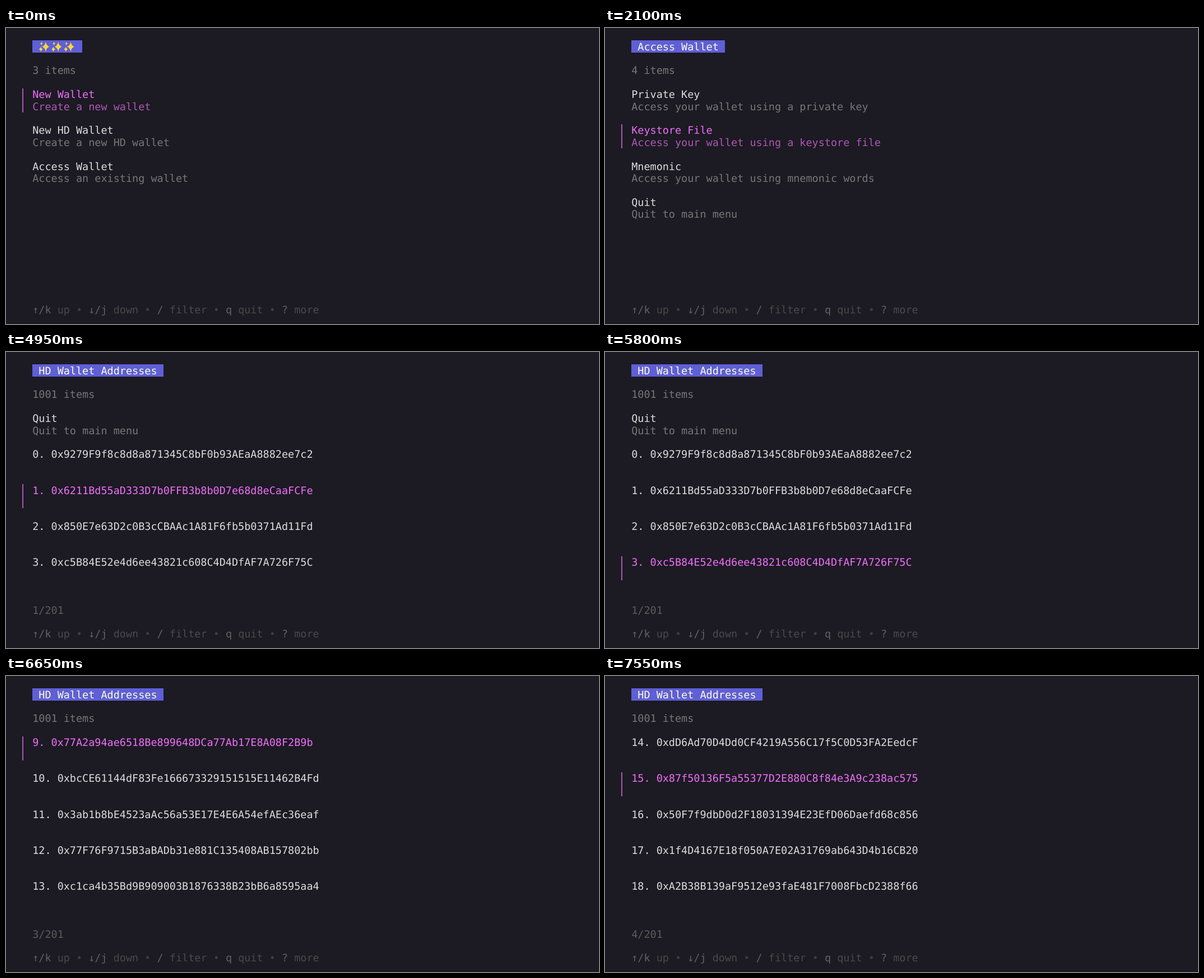
Animation, 1058 px wide and 529 px high, one loop 8 s. Source, as an HTML page:

```html
<!DOCTYPE html>
<html lang="en">
<head>
<meta charset="utf-8">
<title>Wallet terminal</title>
<style>
  html, body { margin: 0; width: 100%; height: 100%; overflow: hidden; background: #1c1a23; }
  svg { display: block; width: 1058px; height: 529px; }
  text {
    font: 18.487px "DejaVu Sans Mono", monospace;
    white-space: pre;
    text-rendering: geometricPrecision;
    font-variant-ligatures: none;
  }
  .badge { fill: #5f5fd7; }
  .badge-text { fill: #ffffd7; }
  .title { fill: #dddddd; }
  .desc { fill: #777777; }
  .title.on { fill: #ee6ff8; }
  .desc.on, .bar { fill: #ad58b4; }
  .page { fill: #5c5c5c; }
  .key { fill: #626262; }
  .hint { fill: #4a4a4a; }
  .dot { fill: #3c3c3c; }
  .heading { fill: #955fd8; font-weight: bold; }
  .input { fill: #dddae6; }
  .cursor { fill: #e0daf0; }
  .note { fill: #585858; font-style: italic; }
  .spark { fill: #fdd835; }
</style>
</head>
<body>
<svg id="screen" viewBox="0 0 1058 529"></svg>
<script>
const LOOP = 8000;
const LEFT = 24.9, TOP = 22.3, COL = 11.13, ROW = 21.4, ASCENT = 17.2;
const screen = document.getElementById("screen");

const colX = c => LEFT + c * COL;
const rowY = r => TOP + r * ROW;

const text = (col, row, cls, body) =>
  `<text x="${colX(col).toFixed(2)}" y="${(rowY(row) + ASCENT).toFixed(2)}" class="${cls}">${body}</text>`;

// Cell backgrounds snap to whole pixels.
function block(col, row, cols, cls) {
  const x = Math.round(colX(col)), y = Math.round(rowY(row));
  const w = Math.round(colX(col + cols)) - x, h = Math.round(rowY(row + 1)) - y;
  return `<rect x="${x}" y="${y}" width="${w}" height="${h}" class="${cls}"/>`;
}

function bar(row) {
  const y = Math.round(rowY(row));
  return `<rect x="29" y="${y}" width="2" height="${Math.round(rowY(row + 2)) - y}" class="bar"/>`;
}

// Four-pointed star with concave sides.
function star(x, y, rx, ry) {
  const k = 0.2;
  const tip = (dx, dy) => `${x + dx * rx} ${y + dy * ry}`;
  const side = (px, py, dx, dy) => `Q${tip(px * k, py * k)} ${tip(dx, dy)}`;
  return `<path d="M${tip(0, -1)}${side(1, -1, 1, 0)}${side(1, 1, 0, 1)}${side(-1, 1, -1, 0)}${side(-1, -1, 0, -1)}Z"/>`;
}

const sparkle = col =>
  `<g class="spark" transform="translate(${colX(col)} 24.2) scale(.152)">` +
  star(83, 62, 42, 58) + star(26, 91, 23, 29) + star(33, 24, 17, 21) + "</g>";

const help = [["↑/k", "up"], ["↓/j", "down"], ["/", "filter"], ["q", "quit"], ["?", "more"]]
  .map(([key, hint]) => `<tspan class="key">${key}</tspan><tspan class="hint"> ${hint}</tspan>`)
  .join('<tspan class="dot"> • </tspan>');

function list({ name, count, items, pages }, selected) {
  const first = Math.floor(selected / 5) * 5;
  let out = name
    ? block(2, 0, name.length + 2, "badge") + text(3, 0, "badge-text", name)
    : block(2, 0, 8, "badge") + [3, 5, 7].map(sparkle).join("");
  out += text(2, 2, "desc", `${count} items`);
  items.slice(first, first + 5).forEach(([title, desc], i) => {
    const row = 4 + i * 3;
    const on = first + i === selected ? " on" : "";
    if (on) out += bar(row);
    out += text(2, row, "title" + on, title);
    if (desc) out += text(2, row + 1, "desc" + on, desc);
  });
  if (pages) out += text(2, 20, "page", `${first / 5 + 1}/${pages}`);
  return out + text(2, 22, "", help);
}

const prompt = words =>
  text(0, 0, "heading", "Mnemonic Words (seperated by space)") +
  text(0, 1, "input", "&gt; " + words) +
  block(2 + words.length, 1, 1, "cursor") +
  text(0, 2, "note", "Press ctrl+c to quit");

const quit = ["Quit", "Quit to main menu"];

const home = {
  count: 3,
  items: [
    ["New Wallet", "Create a new wallet"],
    ["New HD Wallet", "Create a new HD wallet"],
    ["Access Wallet", "Access an existing wallet"]
  ]
};

const access = {
  name: "Access Wallet",
  count: 4,
  items: [
    ["Private Key", "Access your wallet using a private key"],
    ["Keystore File", "Access your wallet using a keystore file"],
    ["Mnemonic", "Access your wallet using mnemonic words"],
    quit
  ]
};

const addresses = `
  9279F9f8c8d8a871345C8bF0b93AEaA8882ee7c2
  6211Bd55aD333D7b0FFB3b8b0D7e68d8eCaaFCFe
  850E7e63D2c0B3cCBAAc1A81F6fb5b0371Ad11Fd
  c5B84E52e4d6ee43821c608C4D4DfAF7A726F75C
  dFf1A08e58766Aa33b406dFB6E75A3907da298A4
  Ea0896aC8252576c409D723c0301462D54477993
  C1ff8A7af2E27d54364311D87F16c672f2BCb508
  Eb7353BEC1C55545f1F6D1D997Bd3026C1172e78
  8970929B0ee04bB02e1673974639717dCA8d6835
  77A2a94ae6518Be899648DCa77Ab17E8A08F2B9b
  bcCE61144dF83Fe166673329151515E11462B4Fd
  3ab1b8bE4523aAc56a53E17E4E6A54efAEc36eaf
  77F76F9715B3aBADb31e881C135408AB157802bb
  c1ca4b35Bd9B909003B1876338B23bB6a8595aa4
  dD6Ad70D4Dd0CF4219A556C17f5C0D53FA2EedcF
  87f50136F5a55377D2E880C8f84e3A9c238ac575
  50F7f9dbD0d2F18031394E23EfD06Daefd68c856
  1f4D4167E18f050A7E02A31769ab643D4b16CB20
  A2B38B139aF9512e93faE481F7008FbcD2388f66`.trim().split(/\s+/);

const wallets = {
  name: "HD Wallet Addresses",
  count: 1001,
  pages: 201,
  items: [quit, ...addresses.map((hex, i) => [`${i}. 0x${hex}`])]
};

const steps = [
  [0, () => list(home, 0)],
  [850, () => list(home, 1)],
  [950, () => list(home, 2)],
  [1400, () => list(access, 2)],
  [2100, () => list(access, 1)],
  [2250, () => list(access, 2)],
  [2500, () => ""],
  [2550, () => prompt("")],
  [3700, () => prompt("ingdom you detect pipe dilemma render clerk rubber")]
];

// One press of "down" at each of these times.
[4950, 5550, 5800, 6000, 6200, 6300, 6400, 6550, 6650, 6750, 6900, 7000, 7100, 7400, 7550]
  .forEach((time, i) => steps.push([time, () => list(wallets, i + 2)]));

let shown = -1;
function draw() {
  const t = performance.now() % LOOP;
  const now = steps.findLastIndex(([time]) => time <= t);
  if (now !== shown) {
    screen.innerHTML = steps[now][1]();
    shown = now;
  }
  requestAnimationFrame(draw);
}
draw();
</script>
</body>
</html>
```
